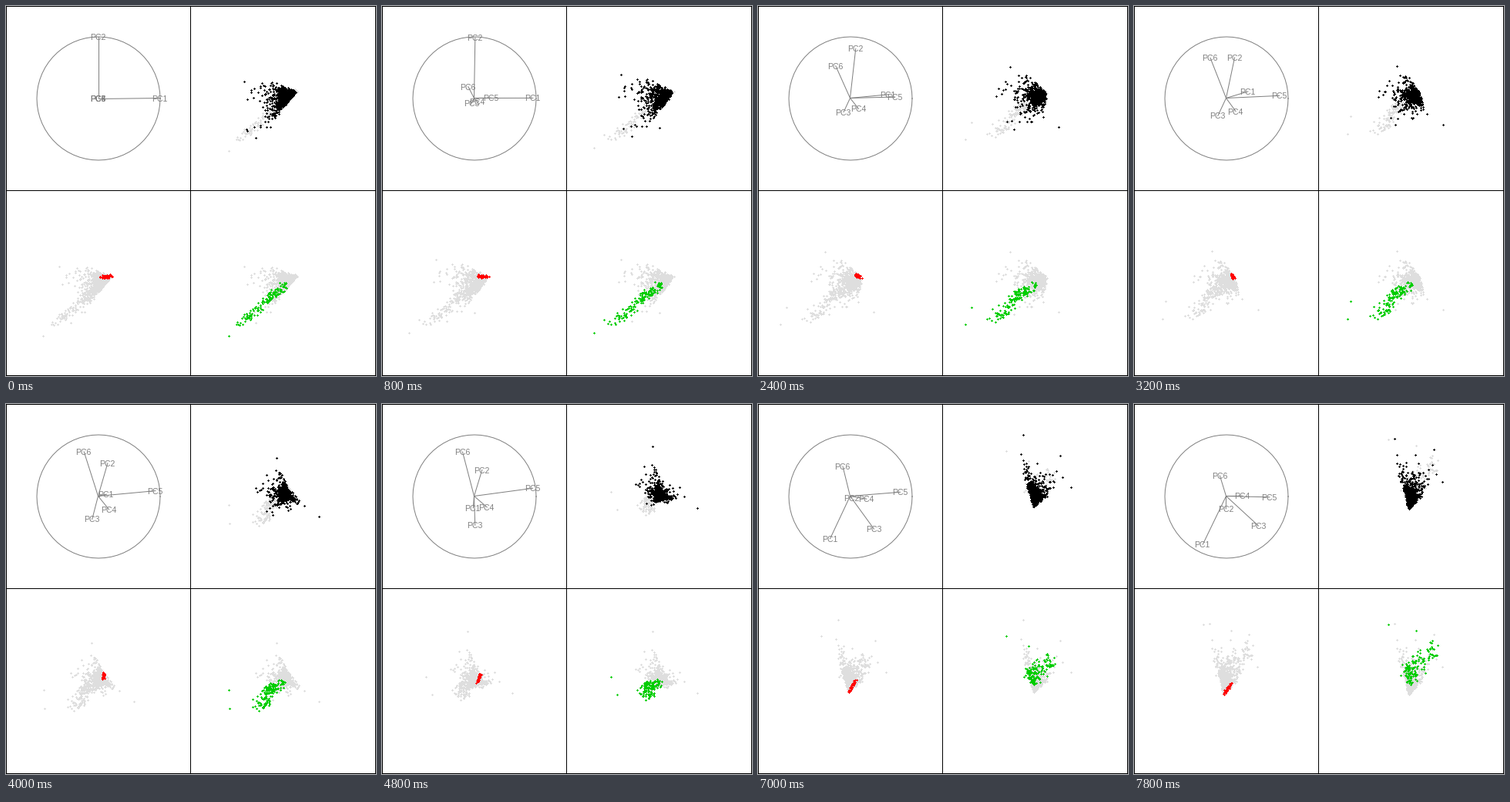
Write a matplotlib script that moves like this. It is 480x480 px and loops after 8000 ms.

```python
import numpy as np
import matplotlib.pyplot as plt
from matplotlib.animation import FuncAnimation
from matplotlib.patches import Rectangle
from matplotlib.path import Path

SIZE, MID, R = 480, 119.5, 80
FRAMES, STEP, TURN_AT = 40, 200, 18
GREY, LIGHT = "#808080", "#dedede"
BLACK, RED, GREEN = "#000000", "#ff0000", "#00cd00"

rng = np.random.default_rng(7)


def plane(x, y):
    """Nearest orthonormal pair of 6-D screen axes."""
    u, _, vt = np.linalg.svd(np.column_stack([x, y]), full_matrices=False)
    return u @ vt


def geodesic(start, end, t):
    """Turn one plane into another along its principal angles."""
    u, cos, vt = np.linalg.svd(start.T @ end)
    if np.linalg.det(u @ vt) < 0:
        u[:, 1] *= -1
        cos[1] *= -1
    angle = np.arccos(cos)
    a, b = start @ u, end @ vt.T
    mix = (np.sin((1 - t) * angle) * a + np.sin(t * angle) * b) / np.sin(angle)
    q = u @ vt
    spin = t * np.arctan2(q[1, 0], q[0, 0])
    c, s = np.cos(spin), np.sin(spin)
    return mix @ u.T @ np.array([[c, -s], [s, c]])


FIRST = np.eye(6, 2)
SECOND = plane([.21, .15, -.14, .165, .905, -.27], [.13, .57, -.31, -.235, .035, .71])
THIRD = plane([-.37, 0, .53, .27, .705, -.105], [-.8, -.21, -.5, 0, -.025, .34])


def view(t):
    if t < TURN_AT:
        b = geodesic(FIRST, SECOND, t / TURN_AT)
    else:
        b = geodesic(SECOND, THIRD, (t - TURN_AT) / (FRAMES - 1 - TURN_AT))
    return b * [1, -1]


def cone(apex, arms, weights, noise):
    """Points spread from the apex along 6-D arms."""
    pts = apex + weights @ np.array(arms)
    return pts + rng.normal(0, noise, pts.shape)


TIP = np.array([17, 9, 3, 2, 3, 0])
black = cone(TIP, [[-32, 3, -3, -2, -22, 5],
                   [-27, -34, -3, -2, -7, 0],
                   [-24, 10, -28, 0, -6, 10],
                   [-20, -25, -3, 5, 20, 0]],
             .13 * rng.exponential(1, (850, 4)) ** 1.3, .8)
green = cone([5, -1, 0, 0, 0, 0], [[-50, -42, 30, 20, -5, 16],
                                   [-22, -16, -2, 0, -18, 0]],
             np.column_stack([1.15 * rng.random(150) ** 3, rng.random(150)]), 2.8)
red = cone(TIP, [[-12, -1, 0, 0, 5, 8]], 1.1 * rng.random((42, 1)), 1)

# A few stragglers far from the crowd.
black = np.vstack([black, [-17, -37, -10, 0, 53, -20]])
green = np.vstack([green, [-57, -54, -20, 0, -55, 22], [-71, -68, 25, 0, -45, 22]])
everything = np.vstack([black, red, green])

fig = plt.figure(figsize=(SIZE / 72, SIZE / 72), dpi=72, facecolor="white")
ax = fig.add_axes([0, 0, 1, 1])
ax.set(xlim=(0, SIZE), ylim=(SIZE, 0))
ax.axis("off")

for p in (0, 239, 479):
    for box in (((p, 0), 1, SIZE), ((0, p), SIZE, 1)):
        ax.add_patch(Rectangle(*box, fc=BLACK, lw=0, aa=False, zorder=5))

ang = np.linspace(0, 2 * np.pi, 61)
ax.plot(120 + R * np.cos(ang), 120 + R * np.sin(ang), color=GREY, lw=1)
spokes = [ax.plot([], [], color=GREY, lw=1)[0] for _ in range(6)]
labels = [ax.text(MID, MID, f"PC{i + 1}", color=GREY, size=10.5, family="Liberation Sans",
                  ha="center", va="center") for i in range(6)]

# Three-pixel cross used for every data point.
s, m = .5, 1.5
CROSS = Path([(-s, -m), (s, -m), (s, -s), (m, -s), (m, s), (s, s), (s, m),
              (-s, m), (-s, s), (-m, s), (-m, -s), (-s, -s), (-s, -m)], closed=True)


def dots(color):
    return ax.plot([], [], ls="", marker=CROSS, ms=3, mew=0, color=color, aa=False)[0]


clouds = []
for corner, data, color in (((240, 0), black, BLACK), ((0, 240), red, RED),
                            ((240, 240), green, GREEN)):
    clouds.append((dots(LIGHT), everything, corner))
    clouds.append((dots(color), data, corner))


def draw(t):
    b = view(t)
    for (x, y), spoke, label in zip(MID + R * b, spokes, labels):
        spoke.set_data([MID, x], [MID, y])
        label.set_position((x - .5, y + 1))
    for line, data, corner in clouds:
        line.set_data(*(data @ b + MID + corner).T)
    return []


anim = FuncAnimation(fig, draw, frames=FRAMES, interval=STEP, repeat=True, repeat_delay=0)
plt.show()
```
